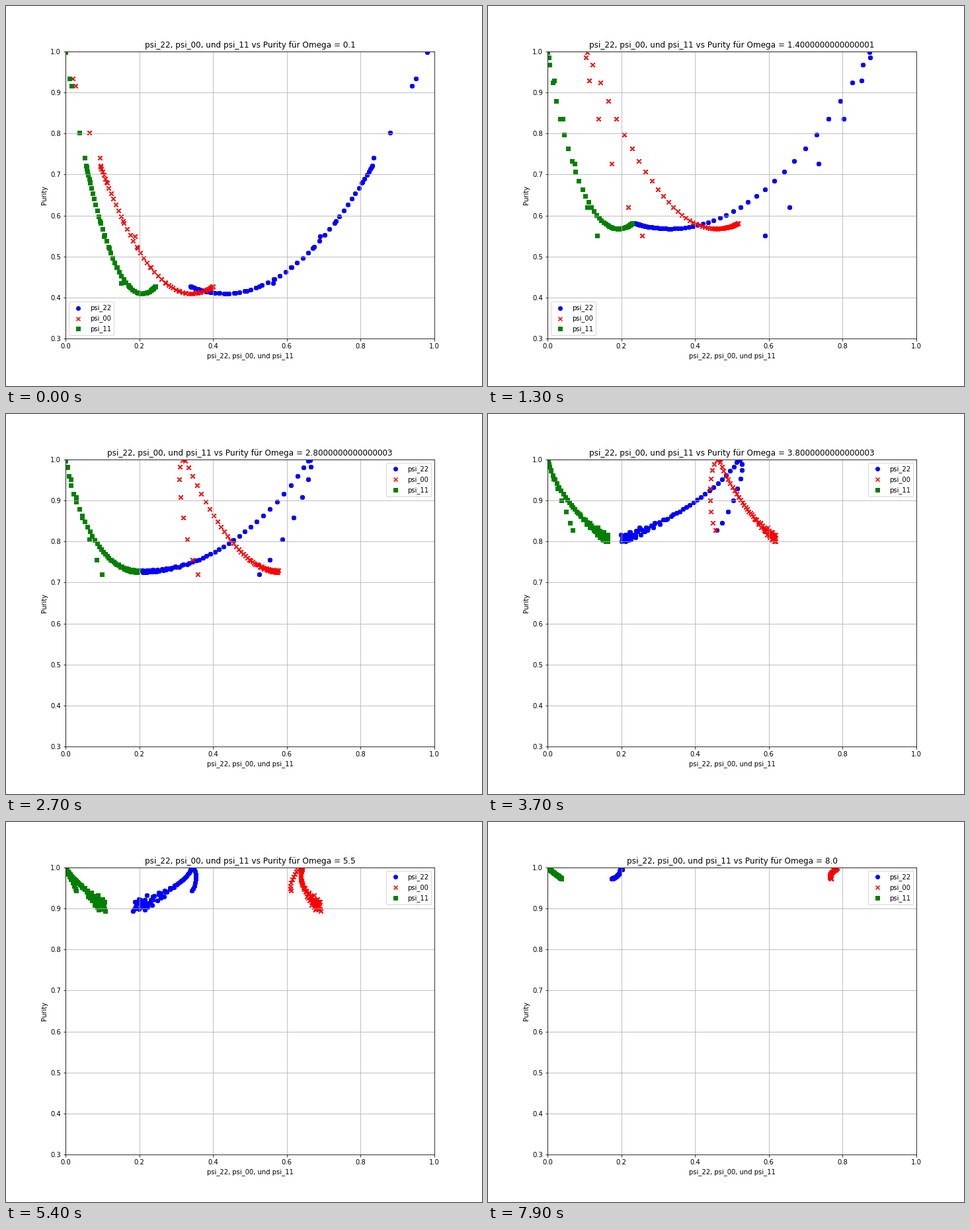
Animation of 720x576 px, one loop 8000 ms. Source, as a matplotlib script:

```python
import numpy as np
import matplotlib.pyplot as plt
from matplotlib.animation import FuncAnimation

plt.rcParams["text.kerning_factor"] = 6

OMEGAS = np.arange(0.1, 8.05, 0.1)
STEPS = np.arange(71)      # samples of the sweep
TOTAL = 0.982              # sum of the three populations
COUPLING = 4.0
PASSES = 3                 # repeated markers give crisp edges


def dark_state(omega):
    """psi_22 of the pure state without any psi_11."""
    return TOTAL * COUPLING**2 / (COUPLING**2 + omega**2)


def smoothstep(x):
    x = np.clip(x, 0, 1)
    return x * x * (3 - 2 * x)


def short_side(omega, u):
    """Path before the dark state, u from 0 (dark) to 1 (first sample)."""
    reach = 0.15 * np.exp(-(omega / 4.3)**2)
    t = 1 - (1 - u**2)**1.4
    p11 = reach * t
    bulge = 0.32 * omega * reach * u * (1 - u)
    p22 = dark_state(omega) + (0.53 * omega - 2.85) * p11 + bulge
    bend = 1 + 0.5 * np.exp(-0.4 * omega) * (1 - t)
    return p22, p11, 1 - (3.8 - 0.34 * omega) * p11 * bend


def long_side(omega, s, length):
    """Path after the dark state, s steps away from it."""
    # mixing saturates; weak driving turns back towards the dark state
    pace = 18 - 14 * np.exp(-1.2 * omega)
    back = np.exp(-2.5 * omega)
    m = (1 - np.exp(-s**2 / (s + 2) / pace)) / (1 - np.exp(-length / pace))
    m = np.minimum(m, 1) * (1 - back * smoothstep((s / length - 0.25) / 0.75))

    drop = 0.57 * np.exp(-0.2 * omega - 0.0225 * omega**2)
    slope = 0.3 + 2.3 / (1 + (omega / 3.6)**4)
    purity = 1 - drop * (slope * m + (1 - slope) * m**2)

    excited = drop * (0.45 + 0.085 * omega + 0.0045 * omega**2)
    p11 = excited * m**(1 + 0.08 * omega)

    start = dark_state(omega)
    end = 0.212 + 0.12 * back - 0.0006 * omega**2
    p22 = start + (end - start) * m**(1 + (omega / 5.5)**4)

    # the late part scatters around medium driving
    size = 0.016 * np.exp(-((omega - 5) / 1.7)**2)
    size = size * np.clip((s / length - 0.25) / 0.3, 0, 1)
    p22 = p22 + size * np.sin(2.4 * s)
    p11 = p11 - 0.6 * size * np.sin(2.4 * s)
    return p22, p11, purity + 0.8 * size * np.cos(1.7 * s)


def sweep(omega):
    """psi_22, psi_00, psi_11 and purity along the sweep."""
    lead = 4 + 1.25 * omega
    s = STEPS - lead
    before = short_side(omega, -s[s < 0] / lead)
    after = long_side(omega, s[s >= 0], s[-1])
    p22, p11, purity = np.hstack([before, after])
    return p22, TOTAL - p22 - p11, p11, np.minimum(purity, 1)


fig, ax = plt.subplots(figsize=(10, 8), dpi=72)
fig.subplots_adjust(left=0.125, right=0.9, bottom=0.125, top=0.88)
dots = [ax.scatter([], [], color=color, marker=marker, label=label)
        for color, marker, label in (("blue", "o", "psi_22"),
                                     ("red", "x", "psi_00"),
                                     ("green", "s", "psi_11"))]
ax.set(xlim=(0, 1), ylim=(0.3, 1),
       xlabel="psi_22, psi_00, und psi_11", ylabel="Purity")
ax.grid(True)
title = ax.set_title("")
low_legend = ax.legend(loc="lower left")
ax.add_artist(low_legend)
high_legend = ax.legend(loc="upper right")


def update(frame):
    omega = OMEGAS[frame]
    *populations, purity = sweep(omega)
    for dot, pop in zip(dots, populations):
        dot.set_offsets(np.tile(np.column_stack([pop, purity]), (PASSES, 1)))
    title.set_text(f"psi_22, psi_00, und psi_11 vs Purity für Omega = {omega}")
    low_legend.set_visible(omega < 1.45)
    high_legend.set_visible(omega >= 1.45)
    return [*dots, title, low_legend, high_legend]


anim = FuncAnimation(fig, update, frames=len(OMEGAS), interval=100,
                     repeat=True, blit=False)
plt.show()
```
